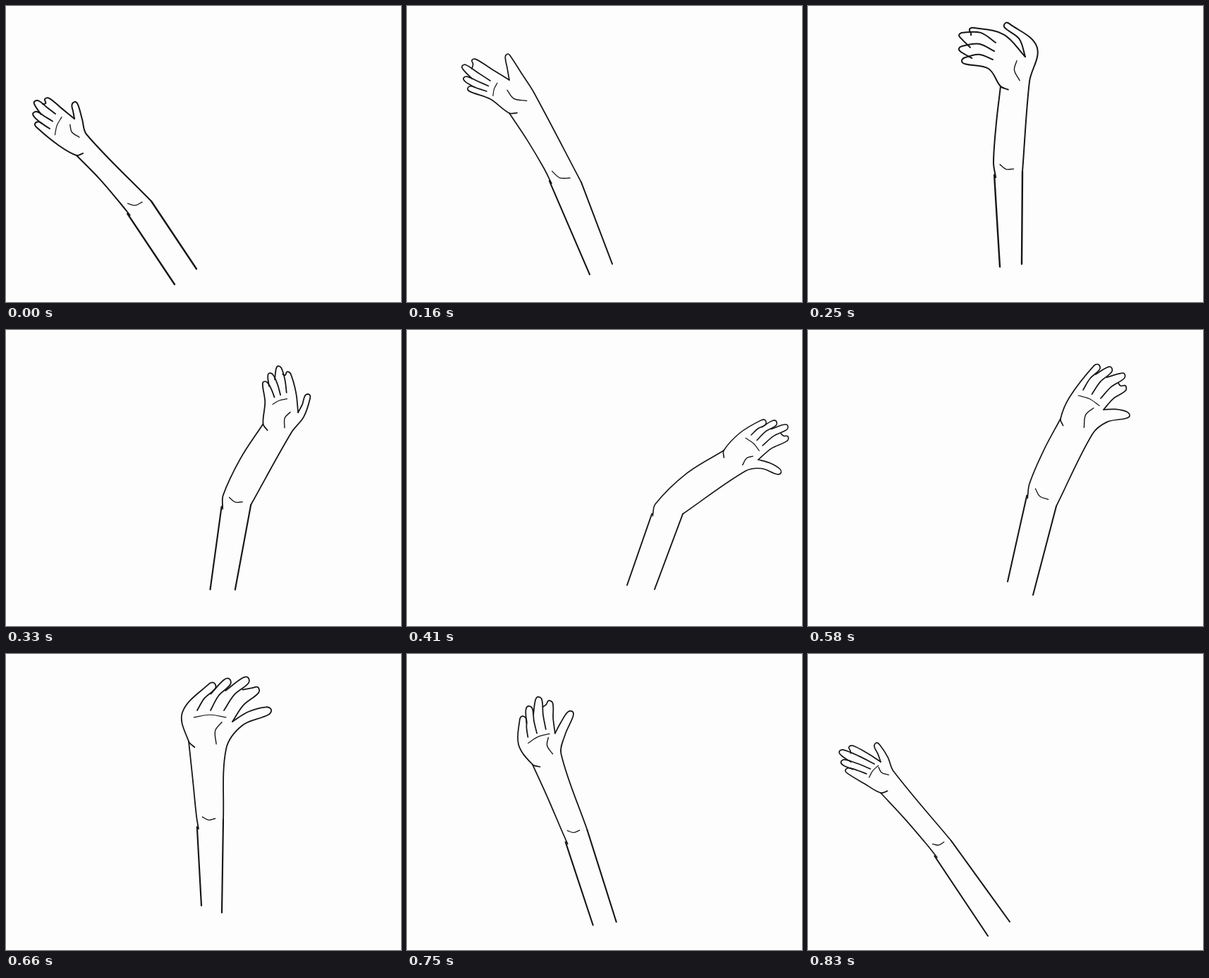
Write an HTML page with a canvas that moves like this. It is 560x420 px and loops after 910 ms.

```html
<!DOCTYPE html>
<html lang="en">
<head>
<meta charset="utf-8">
<title>Waving arm</title>
<style>
  html, body { margin: 0; width: 100%; height: 100%; overflow: hidden; background: #fdfdfd; }
  canvas { display: block; }
</style>
</head>
<body>
<canvas id="stage" width="560" height="420"></canvas>
<script>
const ctx = document.getElementById('stage').getContext('2d');
const LOOP = 910;

const mix = (a, b, t) => a + (b - a) * t;
const add = (p, q) => [p[0] + q[0], p[1] + q[1]];
const sub = (p, q) => [p[0] - q[0], p[1] - q[1]];
const scale = (p, k) => [p[0] * k, p[1] * k];
const lerp = (p, q, t) => [mix(p[0], q[0], t), mix(p[1], q[1], t)];
const length = p => Math.hypot(...p);
const unit = p => scale(p, 1 / (length(p) || 1));
const right = ([x, y]) => [-y, x];
const angleTo = (p, q) => Math.atan2(q[1] - p[1], q[0] - p[0]);
const rotate = ([x, y], a) => [x * Math.cos(a) - y * Math.sin(a), x * Math.sin(a) + y * Math.cos(a)];

// Midpoint of p and q, pushed to the right of the way p -> q by k of its length.
const bow = (p, q, k) => add(lerp(p, q, .5), scale(right(sub(q, p)), k));

// arm:  left and right side of wrist, elbow and shoulder end
// hand: heel, pinky tip, index tip, thumb tip, pinky gap, middle gap, thumb web
// bend: how far fingers and thumb bow to the right
const lowLeft = {
  arm: [[100, 212], [114, 182], [163, 281], [206, 277], [239, 395], [270, 373]],
  hand: [[75, 198], [41, 167], [55, 132], [98, 136], [62, 174], [70, 153], [97, 160]],
  bend: 0, weight: 2
};
const risingLeft = {
  arm: [[145, 152], [180, 123], [194, 230], [247, 250], [259, 381], [291, 366]],
  hand: [[118, 132], [86, 117], [92, 77], [143, 68], [113, 121], [118, 106], [145, 105]],
  bend: 0, weight: 1.7
};
const uprightTrailing = {
  arm: [[273, 114], [314, 107], [263, 222], [304, 235], [272, 370], [303, 366]],
  hand: [[256, 89], [218, 78], [229, 33], [280, 24], [262, 76], [266, 52], [308, 72]],
  bend: .3, weight: 2
};
const lowRight = {
  arm: [[449, 171], [480, 200], [352, 247], [391, 261], [312, 362], [351, 368]],
  hand: [[472, 146], [508, 128], [540, 151], [530, 203], [488, 149], [504, 164], [498, 184]],
  bend: -.13, weight: 1.6
};
const risingRight = {
  arm: [[358, 126], [403, 148], [314, 218], [352, 250], [283, 357], [319, 376]],
  hand: [[371, 95], [412, 49], [450, 79], [456, 122], [390, 85], [415, 97], [419, 113]],
  bend: -.13, weight: 1.7
};
const uprightReturning = {
  arm: [[259, 124], [312, 135], [270, 230], [308, 235], [277, 357], [306, 367]],
  hand: [[250, 83], [295, 41], [357, 47], [376, 79], [271, 80], [309, 80], [321, 96]],
  bend: -.15, weight: 1.8
};
const fallingLeft = {
  arm: [[103, 197], [121, 166], [169, 271], [203, 265], [255, 400], [286, 380]],
  hand: [[80, 184], [53, 165], [58, 132], [97, 126], [83, 170], [94, 156], [103, 153]],
  bend: .05, weight: 1.7
};

function joints({ arm }) {
  const [wrist, elbow, base] = [0, 2, 4].map(i => lerp(arm[i], arm[i + 1], .5));
  const fore = angleTo(elbow, wrist), upper = angleTo(elbow, base);
  return { wrist, elbow, base, fore, upper, flex: fore - upper + Math.PI };
}

// In-between pose: forearm and upper arm each turn about the elbow.
function between(a, b, t) {
  const ja = joints(a), jb = joints(b), elbow = lerp(ja.elbow, jb.elbow, t);
  const turn = (p, q, limb) => {
    const local = lerp(rotate(sub(p, ja.elbow), -ja[limb]), rotate(sub(q, jb.elbow), -jb[limb]), t);
    return add(elbow, rotate(local, mix(ja[limb], jb[limb], t)));
  };
  return {
    arm: a.arm.map((p, i) => turn(p, b.arm[i], i < 2 ? 'fore' : 'upper')),
    hand: a.hand.map((p, i) => turn(p, b.hand[i], 'fore')),
    bend: mix(a.bend, b.bend, t),
    weight: mix(a.weight, b.weight, t)
  };
}

function swing(pose, angle) {
  const { base } = joints(pose);
  const turn = p => add(base, rotate(sub(p, base), angle));
  return { ...pose, arm: pose.arm.map(turn), hand: pose.hand.map(turn) };
}

const timeline = [
  [0, lowLeft],
  [80, swing(lowLeft, -.056)],
  [160, risingLeft],
  [250, uprightTrailing],
  [330, between(uprightTrailing, lowRight, .5)],
  [410, lowRight],
  [500, between(lowRight, risingRight, .4)],
  [580, risingRight],
  [660, uprightReturning],
  [750, between(uprightReturning, fallingLeft, .5)],
  [830, fallingLeft]
];

// Smooth curve through the points, with handles a third of each span long.
function stroke(width, ...points) {
  const heading = i => unit(sub(points[Math.min(i + 1, points.length - 1)], points[Math.max(i - 1, 0)]));
  ctx.lineWidth = width;
  ctx.beginPath();
  ctx.moveTo(...points[0]);
  for (let i = 1; i < points.length; i++) {
    const p = points[i - 1], q = points[i], reach = length(sub(q, p)) / 3;
    ctx.bezierCurveTo(...add(p, scale(heading(i - 1), reach)), ...sub(q, scale(heading(i), reach)), ...q);
  }
  ctx.stroke();
}

// Left side, end and right side of a rounded fingertip.
function fingertip(tip, root, radius) {
  const ahead = scale(unit(sub(tip, root)), radius), side = right(ahead), center = sub(tip, ahead);
  return [sub(center, side), tip, add(center, side)];
}

function drawHand({ arm: [wristL, wristR, , elbowR], hand, bend, weight }, wrist) {
  const [heel, pinky, index, thumb, pinkyGap, middleGap, web] = hand;
  const knuckles = sub(middleGap, pinkyGap);
  const radius = 2.6 + .08 * length(knuckles);

  // The two inner fingers stand out from the line between the outer tips.
  const outward = scale(right(unit(sub(index, pinky))), -1);
  const tips = [pinky, add(lerp(pinky, index, .33), scale(outward, 8)),
                add(lerp(pinky, index, .75), scale(outward, 12.5)), index];
  const gaps = [pinkyGap, lerp(pinkyGap, middleGap, .5), middleGap, web];

  const tuck = scale(add(unit(sub(wristL, heel)), unit(sub(wristR, wristL))), 7);
  let start = [add(wristL, tuck), wristL, heel];
  tips.forEach((tip, i) => {
    const cap = fingertip(tip, gaps[i], radius);
    stroke(weight, ...start, ...cap, bow(gaps[i], cap[2], bend / 2), gaps[i]);
    start = [lerp(cap[2], gaps[i], .25)];
  });

  const cap = fingertip(thumb, web, radius);
  stroke(weight, web, bow(web, cap[0], bend / 2), ...cap, bow(wristR, cap[2], bend), wristR, elbowR);

  const mound = right(sub(wristR, web));
  const moundAt = (t, k) => add(lerp(web, wristR, t), scale(mound, k));
  stroke(1.4, moundAt(.1, .36), moundAt(.45, .52), moundAt(.9, .38));

  // A strongly curled hand turns its palm crease out of sight.
  if (bend < .2) {
    const middle = lerp(gaps[1], wrist, .2), reach = scale(knuckles, .6);
    const from = sub(middle, reach), to = add(middle, reach);
    stroke(1.2, from, bow(from, to, -.08), to);
  }
}

function drawArm({ arm, weight }, flex) {
  const [wristL, , elbowL, elbowR, baseL, baseR] = arm;
  const inward = unit(sub(elbowR, elbowL));
  const hook = add(lerp(elbowL, baseL, .14), scale(inward, 2));
  stroke(weight, wristL, bow(wristL, elbowL, .1 * Math.sin(flex)), elbowL, hook);
  stroke(weight * 1.2, lerp(elbowL, baseL, .12), baseL);
  stroke(weight * 1.2, elbowR, baseR);

  // The crease smooths out once the elbow is well bent.
  if (Math.abs(flex) < .4) {
    const from = lerp(elbowL, elbowR, .22), to = lerp(elbowL, elbowR, .7);
    stroke(1.3, from, bow(from, to, .18), to);
  }
}

function draw(pose) {
  ctx.fillStyle = '#fdfdfd';
  ctx.fillRect(0, 0, 560, 420);
  ctx.strokeStyle = '#161616';
  ctx.lineCap = ctx.lineJoin = 'round';
  const { wrist, flex } = joints(pose);
  drawArm(pose, flex);
  drawHand(pose, wrist);
}

function frame() {
  const time = performance.now() % LOOP;
  draw(timeline.findLast(([start]) => start <= time)[1]);
  requestAnimationFrame(frame);
}
frame();
</script>
</body>
</html>
```
